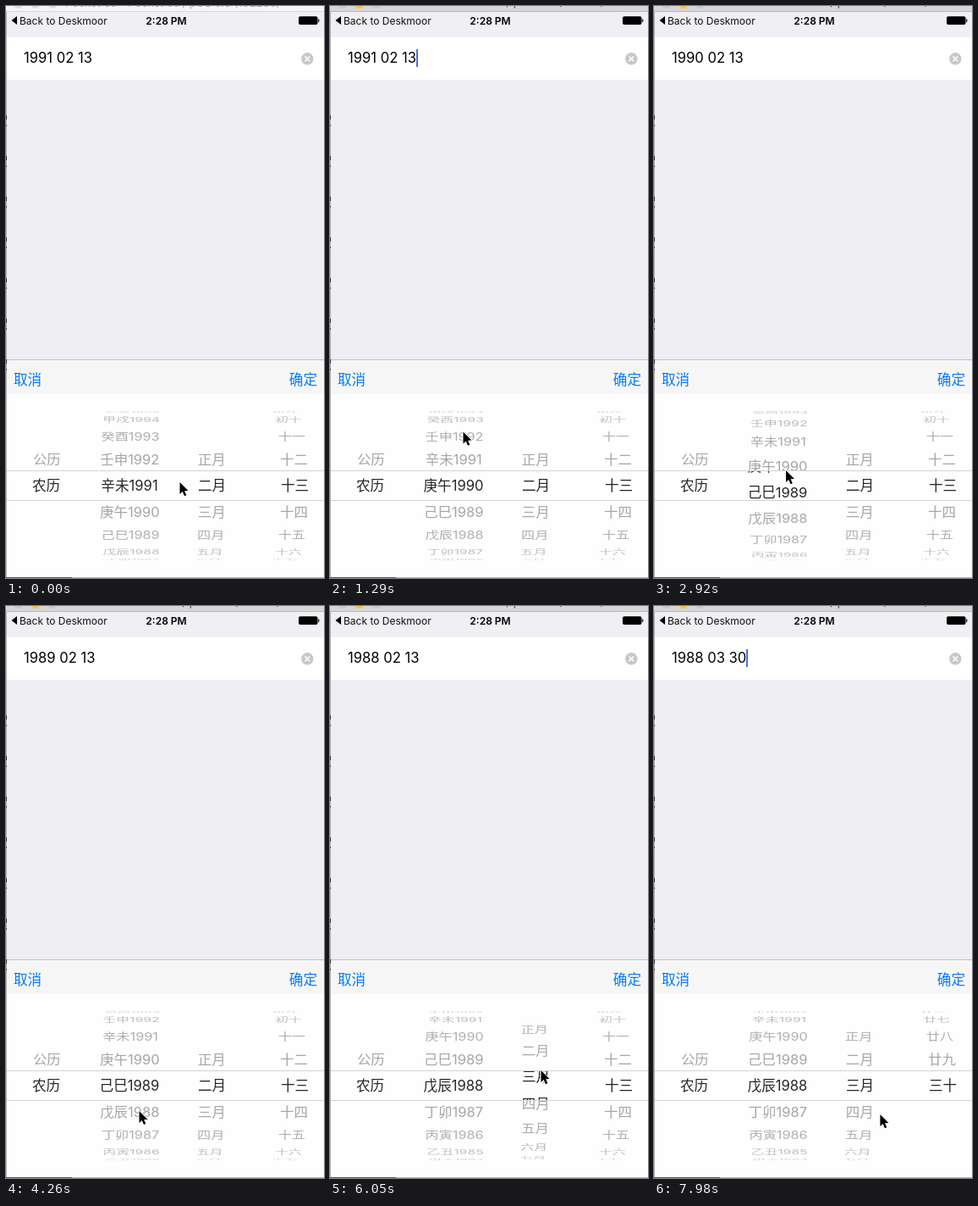
Recreate the animation shown at these times as an HTML page with a canvas. Size 376 by 675 pixels, loop 8000 ms.

```html
<!DOCTYPE html>
<html lang="zh">
<head>
<meta charset="utf-8">
<title>Lunar date picker</title>
<style>
html, body { margin: 0; width: 100%; height: 100%; overflow: hidden; background: #fff; }
canvas { display: block; width: 376px; height: 675px; }
</style>
</head>
<body>
<canvas id="stage"></canvas>
<script>
const W = 376, H = 675, LOOP = 8000;
const canvas = document.getElementById('stage');
const ctx = canvas.getContext('2d');
const dpr = window.devicePixelRatio || 1;
canvas.width = W * dpr;
canvas.height = H * dpr;

const FAMILY = 'Inter, "Noto Sans CJK SC", "Noto Sans CJK", sans-serif';
const BODY = `16.6px ${FAMILY}`;
const BLUE = '#007aff';

// The screen refreshes in steps rather than smoothly.
const STEP = 148.7, LEAD = 54;
const snap = t => Math.max(0, Math.floor((t + LEAD) / STEP) * STEP - LEAD);

const clamp = u => Math.min(1, Math.max(0, u));
const progress = (t, start, length) => clamp((t - start) / length);
const easeOut = (u, power = 2) => 1 - (1 - u) ** power;

// Wheel positions: each term is one flick.
const yearAt = t => 1991
  - easeOut(progress(t, 440, 655), 3)
  - easeOut(progress(t, 2600, 640))
  - easeOut(progress(t, 4260, 640));

const monthAt = t => 2
  + 1.35 * progress(t, 5750, 290)
  - 0.35 * easeOut(progress(t, 6050, 300));

const dayAt = t => 13 + 17 * easeOut(progress(t, 6850, 950));

// Mouse stops: time, x, y
const STOPS = [
  [0, 205.5, 562], [440, 158, 568], [840, 157.5, 508], [1880, 157.5, 495],
  [2600, 156, 572], [2920, 156, 548], [3300, 156, 537], [4260, 157.5, 596],
  [4700, 157, 562], [5750, 249.5, 590], [6050, 249.5, 547], [6850, 340, 600],
  [7250, 338, 502], [7980, 267, 600.5]
];

const EDITS = [
  [-960, '1991 02 13'], [1440, '1990 02 13'], [3660, '1989 02 13'],
  [5160, '1988 02 13'], [6500, '1988 03 13'], [7830, '1988 03 30']
];

function mouseAt(t) {
  const n = Math.max(1, STOPS.findIndex(s => s[0] >= t));
  const [t0, x0, y0] = STOPS[n - 1];
  const [t1, x1, y1] = STOPS[n];
  const u = progress(t, t0, t1 - t0);
  return [x0 + (x1 - x0) * u, y0 + (y1 - y0) * u];
}

function box(x, y, w, h, color) {
  ctx.fillStyle = color;
  ctx.fillRect(x, y, w, h);
}

function disc(x, y, r, color) {
  ctx.fillStyle = color;
  ctx.beginPath();
  ctx.arc(x, y, r, 0, Math.PI * 2);
  ctx.fill();
}

function shape(points, color) {
  ctx.fillStyle = color;
  ctx.beginPath();
  points.forEach(p => ctx.lineTo(p[0], p[1]));
  ctx.closePath();
  ctx.fill();
}

function text(str, x, y, color, font = BODY, align = 'left') {
  ctx.font = font;
  ctx.fillStyle = color;
  ctx.textAlign = align;
  ctx.fillText(str, x, y);
}

// Calendar labels
const NUM = '一二三四五六七八九十';

function yearLabel(y) {
  return '甲乙丙丁戊己庚辛壬癸'[(y - 4) % 10] + '子丑寅卯辰巳午未申酉戌亥'[(y - 4) % 12] + y;
}

function monthLabel(m) {
  if (m === 1) return '正月';
  return (m > 10 ? '十' + NUM[m - 11] : NUM[m - 1]) + '月';
}

function dayLabel(d) {
  if (d === 20) return '二十';
  if (d === 30) return '三十';
  return '初十廿'[Math.floor((d - (d === 10)) / 10)] + NUM[(d + 9) % 10];
}

// Picker wheels
const MID = 566, RADIUS = 88, TURN = 0.361;
const BAND_TOP = 549, BAND_BOTTOM = 583;

const columns = [
  { x: 47.5, min: 0, max: 1, dir: 1, at: () => 1, label: i => ['公历', '农历'][i] },
  { x: 146, min: 1901, max: 2099, dir: -1, at: yearAt, label: yearLabel },
  { x: 243.5, min: 1, max: 12, dir: 1, at: monthAt, label: monthLabel },
  { x: 341.5, min: 1, max: 30, dir: 1, at: dayAt, label: dayLabel }
];

function drawColumn(col, pos, dark) {
  const first = Math.max(col.min, Math.ceil(pos - 5));
  const last = Math.min(col.max, Math.floor(pos + 5));
  for (let i = first; i <= last; i++) {
    const rows = (i - pos) * col.dir;
    const angle = rows * TURN;
    if (Math.abs(angle) >= 1.54) continue;
    const depth = Math.cos(angle);
    const near = 1 / (1 + (1 - depth) * 0.097);
    const gray = 162 + 3 * rows * rows;
    ctx.save();
    ctx.translate(W / 2 + (col.x - W / 2) * near, MID + RADIUS * Math.sin(angle));
    ctx.scale(near, depth);
    text(col.label(i), 0, 6.3, dark ? '#262626' : `rgb(${gray}, ${gray}, ${gray})`, BODY, 'center');
    ctx.restore();
  }
}

function drawWheels(t) {
  const pass = (top, bottom, dark) => {
    ctx.save();
    ctx.beginPath();
    ctx.rect(0, top, W, bottom - top);
    ctx.clip();
    columns.forEach(c => drawColumn(c, c.at(t), dark));
    ctx.restore();
  };
  pass(477, BAND_TOP, false);
  pass(BAND_TOP, BAND_BOTTOM, true);
  pass(BAND_BOTTOM, 655, false);
  box(0, BAND_TOP - 1, W, 1, '#d4d4d4');
  box(0, BAND_BOTTOM, W, 1, '#d4d4d4');
}

function drawTitleBar(active) {
  box(0, 0, W, 7, active ? '#d6d6d6' : '#f5f5f5');
  box(0, 6, W, 1, active ? '#b9b9b9' : '#d8d8d8');
  const plain = active ? '#cbc8c8' : '#dedede';
  [plain, active ? '#f6c244' : plain, plain].forEach((color, i) => disc(14.5 + 20.3 * i, -3, 6, color));
  text('Pocket 6s – Pocket 6s / pOS 9.3 (13E230)', 197, active ? 0 : 1,
    active ? '#444' : '#aaa', `13px ${FAMILY}`, 'center');
}

function drawStatus() {
  box(0, 7, W, 30, '#efeff4');
  shape([[6.5, 17], [13, 12], [13, 22]], '#000');
  text('Back to Deskmoor', 16, 21.5, '#111', `12px ${FAMILY}`);
  text('2:28 PM', 189.5, 21.5, '#000', `600 12px ${FAMILY}`, 'center');
  ctx.beginPath();
  ctx.roundRect(346, 12.3, 22.5, 9.6, 2);
  ctx.fill();
  box(369, 15.5, 1.4, 3.4, '#333');
}

function drawField(t) {
  box(0, 37, W, 50, '#fff');
  const [since, value] = EDITS.filter(e => e[0] <= t).pop();
  text(value, 21, 67.2, '#000');
  if ((t - since) % 1000 < 470) {
    box(Math.round(21 + ctx.measureText(value).width), 51, 2, 21, '#4a6fe0');
  }
  disc(356.3, 62.3, 7.2, '#c8c8cb');
  ctx.strokeStyle = '#fff';
  ctx.lineWidth = 1.5;
  ctx.beginPath();
  [-1, 1].forEach(s => {
    ctx.moveTo(353.5, 62.3 - 2.8 * s);
    ctx.lineTo(359.1, 62.3 + 2.8 * s);
  });
  ctx.stroke();
}

function drawToolbar() {
  box(0, 417, W, 1, '#c3c3c5');
  box(0, 418, W, 40, '#f6f6f6');
  text('取消', 9, 447, BLUE);
  text('确定', 368, 447, BLUE, BODY, 'right');
}

function drawEdges() {
  box(0, 7, 1, H - 7, '#b4b4b6');
  for (let y = 129; y < 440; y += 48) {
    box(0, y, 1, 5, '#333');
    box(0, y + 11, 1, 2, '#555');
  }
  box(0, 674, W, 1, '#b5b5b5');
  box(0, 674, 78, 1, '#5a5a5a');
}

function drawMouse(t) {
  const arrow = [[0, 0], [0, 14], [3.2, 11], [5.5, 16.2], [7.8, 15.2], [5.6, 10.2], [10, 10]];
  ctx.save();
  ctx.translate(...mouseAt(t));
  ctx.lineJoin = 'round';
  ctx.strokeStyle = '#fff';
  ctx.lineWidth = 1.8;
  shape(arrow, '#000');
  ctx.stroke();
  ctx.fill();
  ctx.restore();
}

function draw(t) {
  ctx.setTransform(dpr, 0, 0, dpr, 0, 0);
  box(0, 0, W, H, '#efeef3');
  drawTitleBar(t >= 390);
  drawStatus();
  drawField(t);
  drawToolbar();
  box(0, 458, W, 217, '#fefefe');
  drawWheels(t);
  drawEdges();
  drawMouse(t);
}

function frame() {
  draw(snap(performance.now() % LOOP));
  requestAnimationFrame(frame);
}
frame();
</script>
</body>
</html>
```
